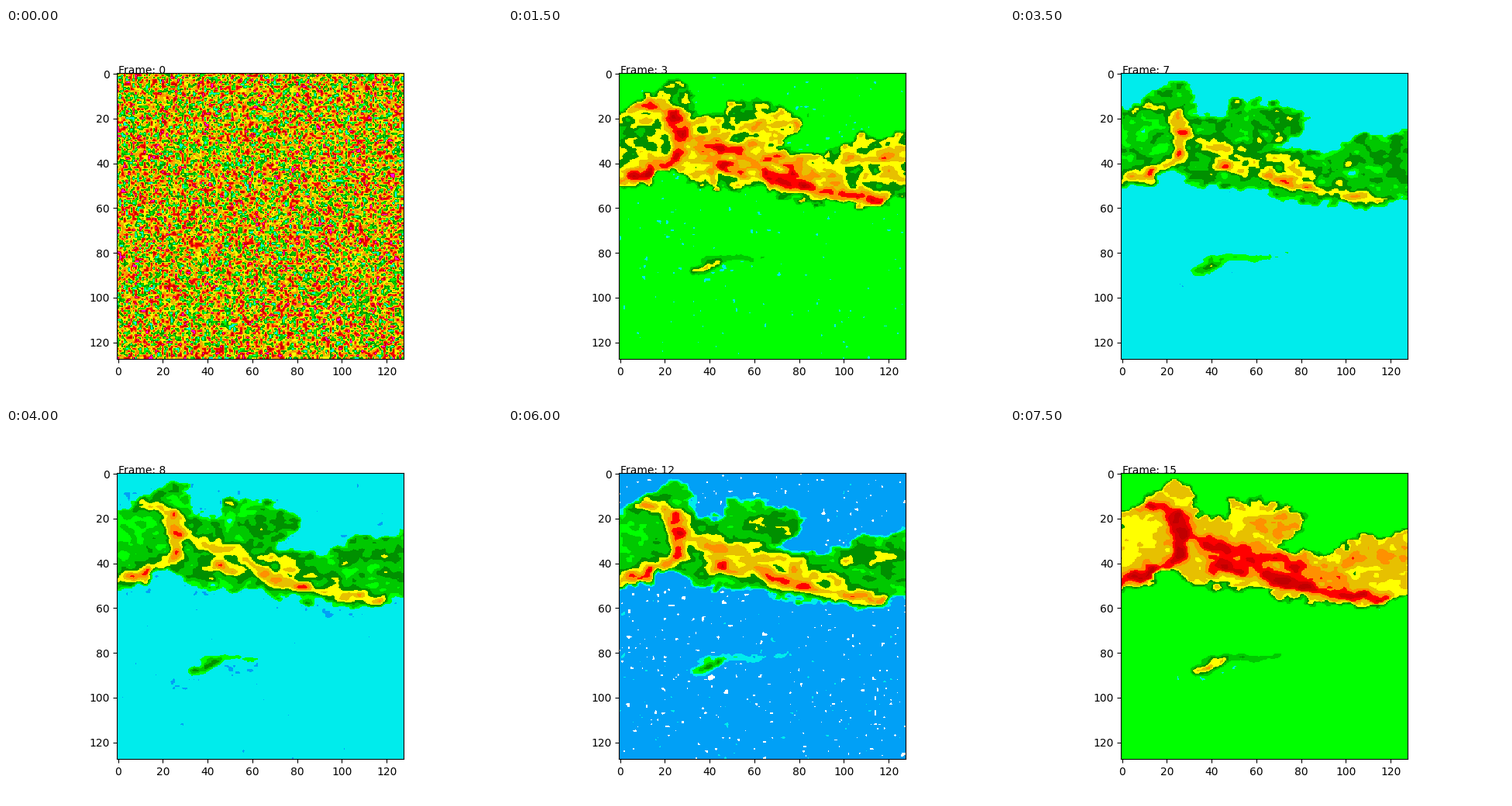
Write a matplotlib script that moves like this. It is 640 px wide and 480 px high and loops after 8 s.

```python
import numpy as np
import matplotlib.pyplot as plt
from matplotlib.animation import FuncAnimation
from matplotlib.colors import ListedColormap
from matplotlib.path import Path

N, FRAMES = 128, 16

COLORS = ["#01a0f6", "#00ecec", "#00ff00", "#00c800", "#009000", "#ffff00",
          "#e7c000", "#ff9000", "#ff0000", "#d60000", "#c00000", "#ff00f0",
          "#9600b4", "#ad90f0"]
cmap = ListedColormap(COLORS)
cmap.set_under("white")


def noise(rng, sx, sy):
    """Gaussian-smoothed noise with unit deviation."""
    fx, fy = np.meshgrid(np.fft.fftfreq(N), np.fft.fftfreq(N))
    kernel = np.exp(-2 * np.pi ** 2 * ((fx * sx) ** 2 + (fy * sy) ** 2))
    z = np.fft.ifft2(np.fft.fft2(rng.normal(size=(N, N))) * kernel).real
    return (z - z.mean()) / z.std()


def bump(x, center, width):
    return np.exp(-((x - center) / width) ** 2)


# Grid bent by noise, so that every shape gets a ragged edge
rng = np.random.default_rng(7)
cols, rows = np.meshgrid(np.arange(N, dtype=float), np.arange(N, dtype=float))
X = cols + 1.1 * noise(rng, 2, 2)
Y = rows + 0.7 * noise(rng, 2, 1.5)


def line_dist(*pts):
    """Distance from every cell to a polyline."""
    best = np.full((N, N), np.inf)
    for (x0, y0), (x1, y1) in zip(pts, pts[1:]):
        dx, dy = x1 - x0, y1 - y0
        t = np.clip(((X - x0) * dx + (Y - y0) * dy) / (dx * dx + dy * dy), 0, 1)
        best = np.minimum(best, np.hypot(X - x0 - t * dx, Y - y0 - t * dy))
    return best


def ridge(height, width, *pts):
    return height * bump(line_dist(*pts), 0, width)


def spot(x, y, r):
    return bump(X, x, r) * bump(Y, y, r)


# Rain band outline: upper side, then back along the lower side
outline = [(-9, 17), (4, 16), (9, 11), (21, 4), (28, 5), (34, 18.5), (46, 19),
           (48, 11.5), (60, 12), (85, 19), (80, 28), (67, 31), (78, 35),
           (90, 36), (98, 33), (106, 26), (118, 28), (137, 22),
           (137, 52), (120, 58), (108, 60), (71, 57), (65, 52), (34, 50.5),
           (22, 42.5), (9, 50), (-9, 53)]
inside = Path(outline).contains_points(np.c_[X.ravel(), Y.ravel()])
depth = line_dist(*outline, outline[0]) * np.where(inside.reshape(N, N), 1, -1)

# Strong lines within the band, broken into lumps
core = np.maximum.reduce([
    ridge(0.82, 5.5, (25, 21), (25, 36)),
    ridge(0.68, 3.8, (11, 14), (17, 15), (24, 21)),
    ridge(0.72, 3.8, (23, 37), (13, 44), (1, 50)),
    ridge(0.54, 5, (27, 28), (44, 33), (70, 38), (96, 50)),
    ridge(0.70, 4.2, (43, 41), (58, 41), (70, 48), (94, 53), (116, 57)),
    ridge(0.30, 4.2, (58, 22), (78, 25)),
    ridge(0.33, 4.2, (102, 38), (125, 38)),
])
core *= 1 + 0.2 * noise(rng, 2.2, 1.6)
for x, y in [(25, 22), (25, 34), (13, 44), (47, 40), (69, 48)]:
    core += 0.2 * spot(x, y, 3.2)
grain = noise(rng, 2.6, 1.8)

cell = ridge(1, 2, (32, 87.5), (39, 86), (48, 83)) * bump(X, 39, 9)
tail = ridge(1, 1.8, (44, 83.5), (66, 82), (78, 80)) * np.clip((82 - X) / 30, 0, 1)
halo = np.exp(np.minimum(depth, 0) / 3.5) + ridge(0.9, 4, (25, 93), (44, 88), (62, 85))


def field(i):
    rng = np.random.default_rng(100 + i)
    if i == 0:
        return np.clip(rng.normal(6, 3.2, (N, N)), 1, 11.9)

    # Ground level drifts down the scale and jumps back up at the end
    ground = np.interp(i, [2, 5, 7, 10, 12, 15], [2.66, 1.5, 1.5, 0.6, 0.44, 2.5])
    rim = ground + 2.1 + 1.3 * abs(i - 7) / 8
    peak = 8.1 + 2.5 * ((i - 8) / 7) ** 2
    speckle = 0.07 + 0.17 * bump(i, 12, 1.2) + 0.2 * bump(i, 1, 1.8)
    sharp = 1 + 0.7 * bump(i, 7, 1.5)
    rough = 0.3 + 0.25 * bump(i, 4, 4)

    fine = noise(rng, 0.45, 0.45)
    patch = noise(rng, 1.2, 0.8)

    base = ground + speckle * fine - 0.5 * halo * np.maximum(fine + patch - 0.9, 0)
    rain = (rim + (peak - rim) * core ** sharp - 0.6 * spot(3, 24, 9)
            + rough * (grain + patch))
    cover = np.clip((depth + 0.7 * patch + 1) / 2.4, 0, 1)
    img = base + (rain - base) * cover
    lift = np.maximum((rim + 1.3 - ground) * cell, 1.4 * tail)
    return img + lift * (1 + 0.2 * patch)


fig, ax = plt.subplots(figsize=(6.4, 4.8), dpi=100)
im = ax.imshow(field(0), cmap=cmap, vmin=0, vmax=len(COLORS))
label = ax.text(0, 0, "Frame: 0")


def update(i):
    im.set_data(field(i))
    label.set_text(f"Frame: {i}")
    return im, label


anim = FuncAnimation(fig, update, frames=FRAMES, interval=500,
                     repeat=True, repeat_delay=0)
plt.show()
```
